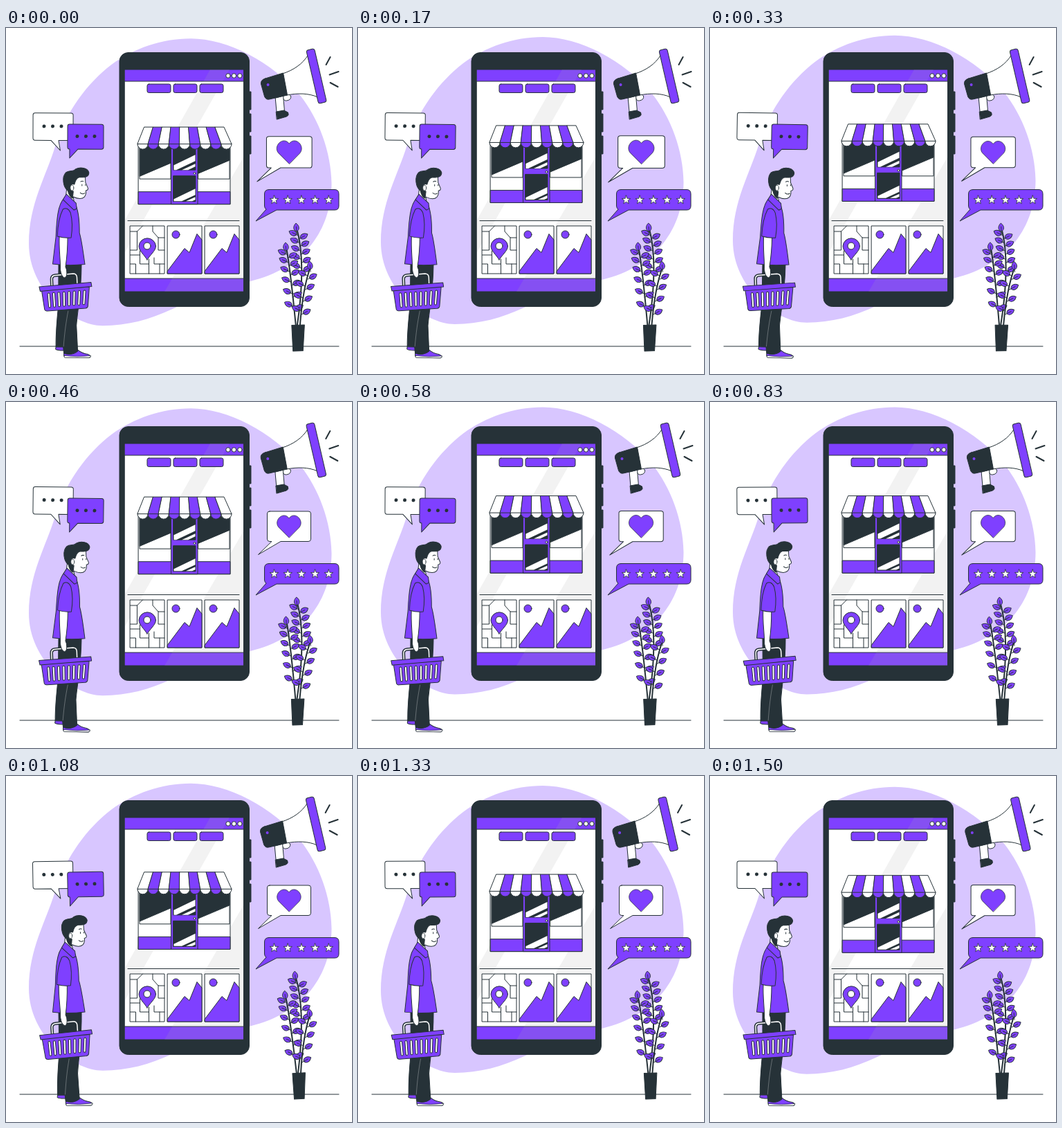
Recreate the animation shown at these times as an HTML page. Size 500 by 500 pixels, loop 1.54 s.

```html
<!DOCTYPE html>
<html lang="en">
<head>
<meta charset="utf-8">
<title>Mobile shop</title>
<style>
  html, body { margin: 0; height: 100%; overflow: hidden; background: #fff; }
  svg { display: block; width: 100vw; height: 100vh; stroke: #263238; stroke-linejoin: round; stroke-linecap: round; }
  .p { fill: #7f40ff; }
  .w { fill: #fff; }
  .d { fill: #263238; }
  .l { fill: none; }
  .n { stroke: none; }
</style>
</head>
<body>
<svg viewBox="0 0 500 500">
  <path id="blob" class="n" fill="#d8c6ff" d="M267 16C320 16 385 50 425 98C452 132 470 180 470.500 226C470 292 432 348 352 367C305 380 268 394 240 407C208 422 175 431 140 431C96 431 33 380 33 312C33 255 58 215 71 172C86 122 118 80 152 54C185 30 225 16 267 16Z"/>
  <path class="l" d="M20 460H481"/>

  <g id="phone">
    <path class="d" d="M351 92h3v26h-3M351 124h3v26h-3M351 156h3v26h-3"/>
    <rect class="d" x="164" y="35.500" width="187.500" height="367" rx="12.500"/>
    <rect class="w" x="171.500" y="60" width="172" height="321"/>
    <path class="p" d="M171.500 60h172v17h-172zM171.500 362h172v19h-172z"/>
    <path class="n" fill="#aaa" opacity=".15" d="M295 60H323L172 324V277ZM343 187V381H229Z"/>
    <path class="l" d="M176 278.500H337"/>
    <g id="screen"></g>
    <g id="map">
      <rect class="w" x="179.500" y="286" width="49.500" height="69"/>
      <path class="l" d="M179.500 294h10l8 -8M189.500 294v27h-10M212 286v8l8 9h9M220 303v18h9M179.500 328h14v-6M193.500 328v13h13v14M179.500 341h8v14M206.500 341v-7M214 332v9h15M222 341v14"/>
      <path class="p" d="M204 335C200 328 192 322 192 315A12.300 12.300 0 0 1 216.500 315C216.500 322 208 328 204 335Z"/>
      <circle class="w" cx="204" cy="315" r="5"/>
    </g>
  </g>

  <g id="shop">
    <rect class="w" x="191.500" y="170" width="132.500" height="85.500"/>
    <path class="p" d="M191.500 237.500h132.500v18h-132.500z"/>
    <path class="w" d="M193.500 172h44.500v47h-44.500zM278 172h45v47h-45z"/>
    <path class="d" d="M193.500 172h44.500v24L193.500 215zM278 172h45v20L278 211z"/>
    <path class="p" d="M239 172h38v83.500h-38z"/>
    <path class="d" d="M242 172h32v34h-32zM242 214.500h32v37h-32z"/>
    <path class="w n" d="M242.500 199L273.500 184V193L246 206H242.500ZM254 206L273.500 197V201L263 206ZM242.500 248L273.500 233V242L254 251H242.500ZM260 251L273.500 245V249L269 251Z"/>
    <circle class="w" cx="272.500" cy="211" r="1.500"/>
    <g id="awning"></g>
  </g>

  <g id="megaphone">
    <path class="w" d="M400 98Q401 106 406 105Q413 104 412 98L408 95"/>
    <path class="w" d="M390 101L401 98L403 121L392 123Z"/>
    <path class="d" d="M391 121L402 119L408 122Q410 126 406 128L392 132Z"/>
    <path class="w" d="M400 66C416 61 429 52 437 39L451 100C438 94 422 94 406 97Z"/>
    <path class="d" d="M375 73L401 65L407 97L381 103Q376 104 374 99L369 81Q368 75 375 73Z"/>
    <circle class="p n" cx="379" cy="82" r="2"/>
    <rect class="p" x="443" y="30" width="12" height="79" rx="3" transform="rotate(-13 449 69.500)"/>
    <path class="l" stroke-width="2" d="M463 53L469 42M468 67.500L481 63M469 79L480 85"/>
  </g>

  <g id="chat">
    <path class="w" d="M42 123H94Q97 123 97 126V159Q97 162.500 94 162.500H76L78.500 177L65 162.500H42Q39 162.500 39 159V126Q39 123 42 123Z"/>
    <path class="p" d="M92 139H138Q141 139 141 142V172Q141 175 138 175H104L92 188V175Q89 175 89 172V142Q89 139 92 139Z"/>
    <g id="dots" class="d n"></g>
  </g>

  <g id="like">
    <path class="w" d="M381 158H437Q440.500 158 440.500 161V198Q440.500 201.500 437 201.500H397L364.500 220.500L384 201.500H381Q377.500 201.500 377.500 198V161Q377.500 158 381 158Z"/>
    <path class="p" stroke-width=".7" d="M409 196L394 181C386 171 401 157 409 168C417 157 432 171 424 181Z"/>
  </g>

  <g id="rating">
    <path class="p" d="M380 233.500H475Q481 233.500 481 240V257Q481 263 475 263H391L361 279L376 262Q373.500 260 373.500 257V240Q373.500 233.500 380 233.500Z"/>
  </g>

  <g id="plant">
    <path class="d" d="M413 429.500L431.500 429L429.500 466.500L415 467Z"/>
  </g>

  <g id="man">
    <path class="p" d="M73 458L72 464Q73 466 84 466L85 458Z"/>
    <path class="p" d="M85 467Q83 473 85 476L121 476.500Q125 474 119 471.500Q110 470 104 465Z"/>
    <path class="w" stroke-width=".7" d="M84.500 473.500Q103 476 123 473.500Q123 476 120 476.500H86Q84 476 84.500 473.500Z"/>
    <path class="d" d="M76 341L109 342C109 380 104 405 102 430L104 467Q95 474 84 470L83 461H72.500C72 440 74 420 76 400Z"/>
    <path class="l" stroke="#fff" stroke-width=".3" d="M83.500 460C85 440 87 425 90 409"/>
    <path class="w" d="M88 226L86 245L99 258L97 244Q108 249 113 244Q116 240 115 235Q119 234 118 231L114.500 223L114 212H99Z"/>
    <path class="d" d="M89 235C82 230 80 215 86 209C91 205 97 208 100 204C107 200 118 202 119.500 209C119 216 112 216 106 215.500C101 217 100 221 98.500 226Q93 224 93 230Q94 236 97 236L96 246Q91 244 89 235Z"/>
    <ellipse class="w" cx="95" cy="231" rx="2.500" ry="4" stroke-width=".8"/>
    <path class="l" d="M109.500 226v2M114.500 226v1.500M107.500 222q2 -1.500 4 -.5M107 238q3 3 6.500 .5"/>
    <path class="p" d="M84 246C74 255 73 280 72 302L67.500 341Q90 344 114 341.500C111 320 109 305 106 296C106 280 105 267 101 257Z"/>
    <path class="p" d="M87 240L82 248L98 263L102 261L101 253Z"/>
    <g id="basket">
      <path class="l" stroke-width="4.500" d="M66.500 373L66 363Q66 358 71 357.500L97 355Q102 355 102.500 360L103 370"/>
      <path class="l" stroke="#fff" stroke-width="1.500" d="M66.500 373L66 363Q66 358 71 357.500L97 355Q102 355 102.500 360L103 370"/>
      <path class="p" d="M51.500 379L56 407Q57 409.500 60 409L115 405Q118 404.500 118.500 402L120.500 374Z"/>
      <path class="p" d="M48 374L123 367.500L124 373.500L49.500 380.500Z"/>
    </g>
    <path class="w" d="M77 301C76 320 79 335 78.500 349Q80 360 85 361Q89 360 87.500 349L86 345Q89 325 89 301Z"/>
    <path class="p" d="M82 262C76 274 74.500 288 74 301Q84 304 94 303C96 290 96 278 93 267Q89 258 82 262Z"/>
  </g>
</svg>
<script>
const $ = id => document.getElementById(id);
const add = (id, markup) => $(id).insertAdjacentHTML('beforeend', markup);
const repeat = (n, f) => Array.from({ length: n }, (_, i) => f(i)).join('');
const path = (cls, d, more = '') => `<path class="${cls}" d="${d}" ${more}/>`;
const circle = (cls, x, y, r) => `<circle class="${cls}" cx="${x}" cy="${y}" r="${r}"/>`;

// Phone screen: window buttons, tabs and picture cards
add('screen', repeat(3, i =>
  circle('w', 321 + i * 8.5, 69, 3.2) +
  `<rect class="p" x="${204 + i * 38}" y="81" width="34" height="12.5" rx="2.5"/>`));
add('screen', repeat(2, i => `<g transform="translate(${i * 54})">` +
  path('w', 'M233.500 286h49.500v69h-49.500z') +
  path('p', 'M233.500 351L258 318.500L265 324.500L276 297.500L283 306V355H233.500Z') +
  circle('p', 245.5, 298.5, 5.5) + '</g>'));

// Striped awning with scalloped edge
add('awning', repeat(9, i => {
  const top = 200 + i * 115 / 9, w = 136 / 9, left = 190 + i * w;
  return path(i % 2 ? 'p' : 'w',
    `M${top} 144h${115 / 9}L${left + w} 168.500a${w / 2} 7.500 0 0 1 ${-w} 0Z`);
}) + path('l', 'M190 168.500H326'));

add('dots', repeat(3, i =>
  circle('', 55 + i * 12.5, 142, 2.5) + circle('', 103 + i * 12.5, 156.5, 2.5)));

const star = (x, y) => 'M' + Array.from({ length: 10 }, (_, i) => {
  const a = (i / 5 - .5) * Math.PI, r = i % 2 ? 2.7 : 6.5;
  return [x + r * Math.cos(a), y + r * Math.sin(a)].map(v => v.toFixed(1));
}).join('L') + 'Z';
add('rating', repeat(5, i => path('w', star(387.5 + i * 19.7, 248.5), 'stroke-width=".8"')));

add('basket', repeat(8, i =>
  `<rect class="w" x="${61 + i * 7.2}" y="${383 - i * .6}" width="3" height="21" rx="1.5"
    transform="rotate(${-5 + i * 1.2} ${62.5 + i * 7.2} 393)"/>`));

// A stem is a quadratic curve from its tip to the pot, with leaves in pairs
function stem(x0, y0, x1, y1, x2, pairs, end) {
  const y2 = 430;
  const mix = (a, b, c, t) => a * (1 - t) ** 2 + 2 * b * t * (1 - t) + c * t * t;
  const leaf = (x, y, a) => path('p', 'M0 0H3C5 -5 11 -5 15 0C11 5 5 5 3 0L10 0',
    `stroke-width=".9" transform="translate(${x} ${y}) rotate(${a})"`);
  add('plant', path('l', `M${x0} ${y0}Q${x1} ${y1} ${x2} ${y2}`, 'stroke-width="2"') +
    leaf(x0, y0 + 7, -95) +
    repeat(pairs, i => {
      const t = (i + 1) / pairs * end;
      const x = mix(x0, x1, x2, t), y = mix(y0, y1, y2, t);
      return leaf(x, y, -155) + leaf(x, y + 5, -28);
    }));
}
stem(420, 290, 434, 340, 421, 5, .48);
stem(405, 318, 411, 350, 419, 6, .82);
stem(440, 345, 429, 375, 425, 4, .8);

const PERIOD = 1540, LEAD = 65;
const float = [[0, 0], [.5, -10], [1, 0]];
const sway = [[0, 0], [.25, 1], [.75, -1], [1, 0]];
const beat = [[0, 1], [.1, 1.1], [.3, 1], [.4, 1], [.5, 1.1], [.6, 1], [1, 1]];
const shake = [[0, 0], [.1, -1], [.2, 2], [.3, -4], [.4, 4], [.5, -4], [.6, 4], [.7, -4], [.8, 2], [.9, -1], [1, 0]];

function at(keys, u) {
  const i = keys.findIndex(k => k[0] > u);
  const [[a, from], [b, to]] = [keys[i - 1], keys[i]];
  return from + (to - from) * (u - a) / (b - a);
}
const move = (id, value) => $(id).setAttribute('transform', value);

let start;
function draw(now) {
  start ??= now;
  const u = (now - start + LEAD) % PERIOD / PERIOD;
  const lift = `translate(0 ${at(float, u)})`, angle = at(sway, u);
  move('blob', lift);
  move('shop', lift);
  move('man', `rotate(${angle} 86 340)`);
  move('plant', `rotate(${angle} 422 374)`);
  move('chat', `rotate(${angle} 90 155)`);
  move('like', `translate(402.500 189) scale(${at(beat, u)}) translate(-402.500 -189)`);
  move('megaphone', `translate(${at(shake, u)} 0)`);
  requestAnimationFrame(draw);
}
requestAnimationFrame(draw);
</script>
</body>
</html>
```
